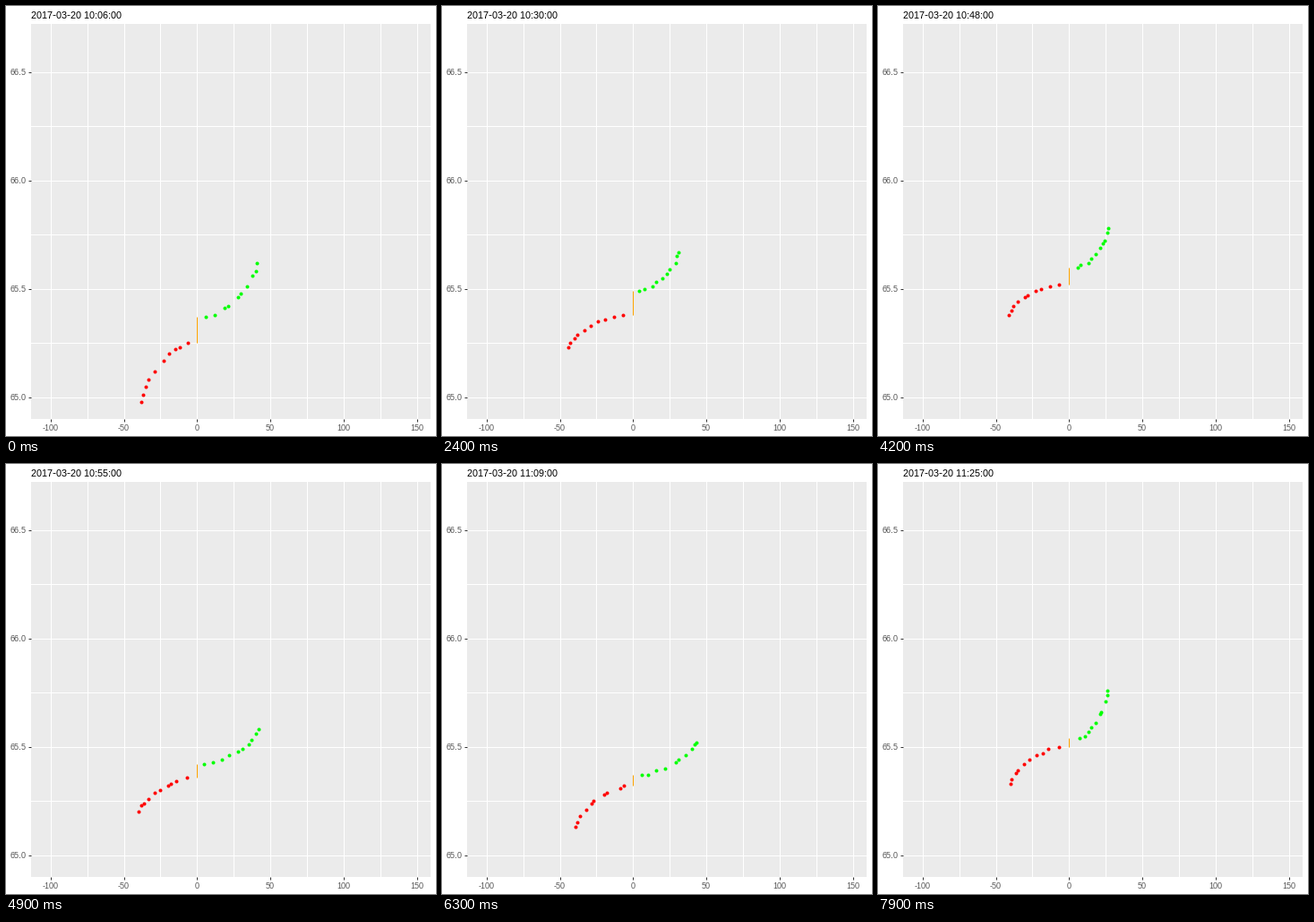
A matplotlib script for the animation above (8000 ms loop, 480 by 480 pixels).

```python
import matplotlib.pyplot as plt
import numpy as np
from matplotlib.animation import FuncAnimation

FRAMES, INTERVAL, SIZE, DPI = 80, 100, 480, 72  # one point is one pixel
START = 10 * 60 + 6                             # minutes since midnight
LEVELS = 10
plt.rcParams.update({
    "font.family": "Liberation Sans", "axes.unicode_minus": False,
    "text.hinting": "native", "text.hinting_factor": 1})

# Turning points of the market: mid price, spread and price depth in cents.
TURNS = [0, 12, 24, 42, 56, 70, 79]
MID = [31, 34.5, 43.5, 56, 33.5, 47, 52]
SPREAD = [12, 11, 11, 8, 5, 6, 4]
ASK_DEPTH = [25, 36, 18, 18, 14, 17, 22]
BID_DEPTH = [27, 15, 15, 14, 18, 19, 17]
ASK_VOL = [41, 38, 31, 27, 56, 30, 26]
BID_VOL = [38, 37, 44, 41, 38, 40, 40]
SAG = 6                                         # dip between turning points


def side(i, sign, best, depth, volume):
    """One side of the book: volume flattens out, price steepens."""
    rng = np.random.default_rng(2 * i + (sign > 0))
    u = np.linspace(0, 1, LEVELS)
    u[1:-1] += rng.uniform(-0.04, 0.04, LEVELS - 2)
    first = rng.integers(4, 8)
    vol = first + (volume - first) * (1 - (1 - u) ** 1.5)
    cents = np.rint(best + sign * depth * u ** 1.35)
    return sign * np.rint(vol), 65 + cents / 100


def book(i):
    """Ask and bid levels at step i as (volume, price) pairs."""
    def at(track):
        return np.interp(i, TURNS, track)

    phase = np.interp(i, TURNS, range(len(TURNS)))
    mid = at(MID) - SAG * abs(np.sin(np.pi * phase))
    half = at(SPREAD) / 2
    return (side(i, 1, mid + half, at(ASK_DEPTH), at(ASK_VOL)),
            side(i, -1, mid - half, at(BID_DEPTH), at(BID_VOL)))


fig = plt.figure(figsize=(SIZE / DPI, SIZE / DPI), dpi=DPI, facecolor="white")
ax = fig.add_axes([28 / SIZE, 19 / SIZE, 446 / SIZE, 441 / SIZE])
ax.set_facecolor("#EBEBEB")
X0, SX, Y0, SY = 213.3, 1.636, 436.7, 242.0     # pixel origin and scale
ax.set_xlim((28 - X0) / SX, (474 - X0) / SX)
ax.set_ylim(65 - (461 - Y0) / SY, 65 + (Y0 - 20) / SY)
for edge in ax.spines.values():
    edge.set_visible(False)

ax.set_xticks(range(-100, 151, 50))
ax.set_xticks(range(-75, 126, 50), minor=True)
ax.set_yticks(np.arange(65, 67, 0.5))
ax.set_yticks(np.arange(65.25, 66.5, 0.5), minor=True)
ax.yaxis.set_major_formatter("{x:.1f}")
ax.set_axisbelow(True)
ax.grid(which="both", color="white", lw=1)
ax.tick_params(which="minor", length=0)
ax.tick_params(which="major", length=3, width=1, color="#333333",
               labelcolor="#4D4D4D", labelsize=9, pad=2)
ax.tick_params(axis="x", pad=3)

clock = fig.text(28 / SIZE, 1 - 14 / SIZE, "", fontsize=11, color="black")
spread, = ax.plot([], [], color="orange", lw=1, solid_capstyle="butt")
dots = [ax.plot([], [], "o", color=c, ms=4, mew=0, antialiased=False)[0]
        for c in ("#00FF00", "#FF0000")]


def update(i):
    asks, bids = book(i)
    for dot, levels in zip(dots, (asks, bids)):
        dot.set_data(*levels)
    spread.set_data([0, 0], [bids[1][0], asks[1][0]])
    hour, minute = divmod(START + i, 60)
    clock.set_text(f"2017-03-20 {hour}:{minute:02d}:00")
    return [clock, spread, *dots]


anim = FuncAnimation(fig, update, frames=FRAMES, interval=INTERVAL,
                     repeat=True, repeat_delay=0)
plt.show()
```
